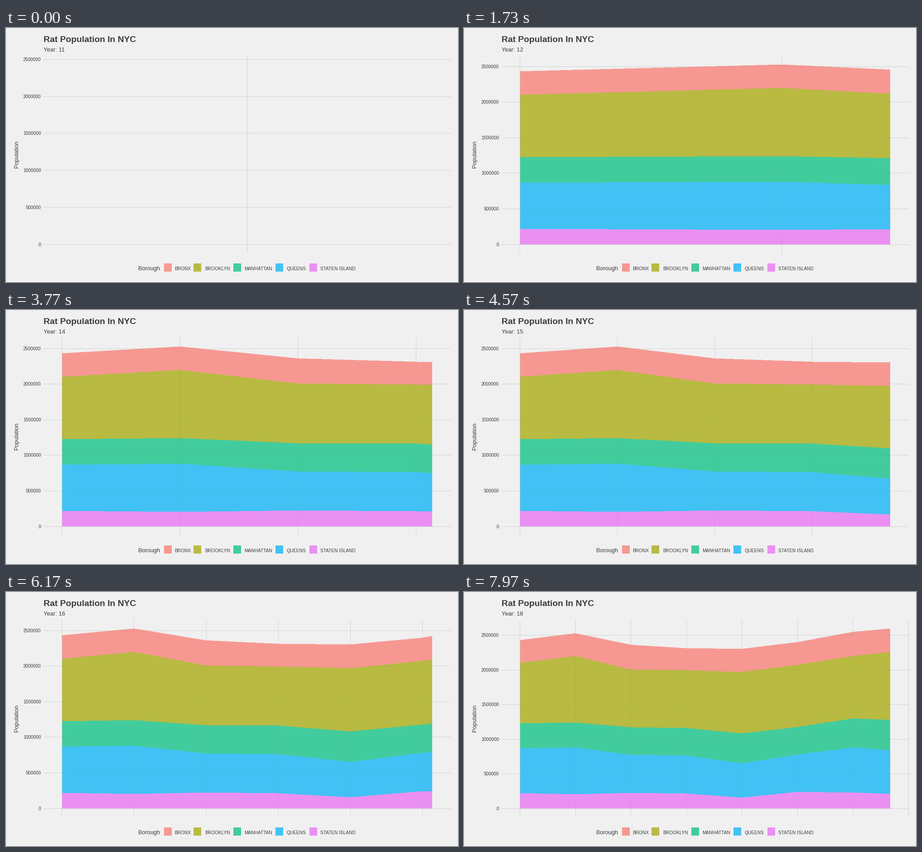
Write a matplotlib script that moves like this. It is 998 by 561 pixels and loops after 8 s.

```python
import matplotlib.pyplot as plt
import numpy as np
from matplotlib.animation import FuncAnimation
from matplotlib.collections import LineCollection
from matplotlib.path import Path
from matplotlib.patches import Rectangle

W, H, DPI = 998, 561, 100
FRAMES, LOOP = 240, 8000
BG, GRID, INK = "#f0f0f0", "#d2d2d2", "#3c3c3c"
X0, SPAN = 123.8, 817.8            # data area: left edge and width
Y0, RISE = 478.0, 396.9            # data area: zero line and height
FILL_L, FILL_R = 124, 941          # whole-pixel sides of the bands
LEFT, RIGHT, TOP, BOTTOM = 83, 982.5, 61, 497
CELL = 0.75                        # size of one stair step in pixels
ALPHA = 0.725

NAMES = ["BRONX", "BROOKLYN", "MANHATTAN", "QUEENS", "STATEN ISLAND"]
HUES = ["#f8766d", "#a3a500", "#00bf7d", "#00b0f6", "#e76bf3"]
KEY_X = [348.7, 414, 502, 595, 670]
LABEL_X = [372.5, 438.7, 526, 619.6, 693.7]

# stacked totals per year in thousands, top band first
TOTALS = np.array([
    [2429, 2526, 2359, 2314, 2300, 2400, 2545, 2620],
    [2102, 2198, 2005, 1992, 1968, 2073, 2200, 2287],
    [1225.5, 1237, 1168, 1160, 1080, 1174, 1297, 1267],
    [867, 878, 770, 761, 650, 778, 881, 813],
    [217, 204, 220, 214, 153, 239, 227, 198],
])
YEARS = np.arange(8)
TICKS = np.arange(0, 2501, 500)

plt.rcParams["font.family"] = ["Liberation Sans", "DejaVu Sans"]


def over_bg(color):
    rgb = [int(color[i:i + 2], 16) / 255 for i in (1, 3, 5)]
    return [ALPHA * c + (1 - ALPHA) * 240 / 255 for c in rgb]


def text(x, y, s, px, **kw):
    kw = {"va": "baseline", "color": INK, **kw}
    return ax.text(x, y, s, fontsize=px * 72 / DPI, **kw)


fig = plt.figure(figsize=(W / DPI, H / DPI), dpi=DPI, facecolor="white")
ax = fig.add_axes([0, 0, 1, 1])
ax.set_xlim(0, W)
ax.set_ylim(H, 0)
ax.axis("off")

ax.add_patch(Rectangle((0, 0), W, H - 1, color=BG, lw=0, zorder=0))
grid = LineCollection([], colors=GRID, lw=0.72, zorder=1, snap=False)
shade = LineCollection([], colors="black", alpha=0.04, lw=0.72, zorder=3,
                       snap=False)
ax.add_collection(grid, autolim=False)
ax.add_collection(shade, autolim=False)

bands = []
for name, hue, kx, lx in zip(NAMES, HUES, KEY_X, LABEL_X):
    fill = over_bg(hue)
    band, = ax.fill([0, 0, 0], [0, 0, 0], color=fill, lw=0, zorder=2,
                    snap=False)
    bands.append(band)
    ax.add_patch(Rectangle((kx, 520.2), 17, 17.3, color=fill, lw=0))
    text(lx, 534.6, name, 10.1)

text(82.6, 31, "Rat Population In NYC", 19.3, weight="bold")
year_text = text(82.6, 52, "", 12.9)
text(29.7, 279, "Population", 12.8, rotation=90, ha="right", va="center")
text(292, 535.4, "Borough", 12.8)
tick_texts = [text(77.3, 0, str(t * 1000), 10, ha="right") for t in TICKS]


def stairs(xs, px, py):
    """Edge through the points, as steps of whole cells."""
    gx, gy = np.rint(np.array(px) / CELL), np.rint(np.array(py) / CELL)
    return np.floor(np.interp(xs / CELL, gx, gy) + 1e-6) * CELL


def band_shape(px, py):
    xs = np.arange(FILL_L, FILL_R, CELL)
    ys = np.repeat(stairs(xs + CELL / 2, px, py), 2)
    sides = np.column_stack([xs, np.minimum(xs + CELL, FILL_R)]).ravel()
    top = np.column_stack([sides, ys])
    return np.vstack([[FILL_L, Y0], top, [FILL_R, Y0]])


def draw(k):
    now = np.interp(k, [0, 216, 250], [0, 6, 7])
    known = YEARS[YEARS < now] if k else YEARS[:1]
    times = np.append(known, now)
    values = [np.interp(times, YEARS, row) for row in TOTALS]
    scale = RISE / values[0].max()

    if k:
        years = YEARS[YEARS <= now * 1.05]
        cols = X0 + SPAN * years / now
    else:
        cols = np.array([532.5])
    rows = Y0 - TICKS * scale
    lines = [[(LEFT, np.floor(y) + .5), (RIGHT, np.floor(y) + .5)] for y in rows]
    lines += [[(np.floor(x) + .5, TOP), (np.floor(x) + .5, BOTTOM)] for x in cols]
    grid.set_segments(lines)
    shade.set_segments(lines if k else [])

    for band, row in zip(bands, values):
        band.set_visible(k > 0)
        if k:
            band.set_xy(band_shape(X0 + SPAN * times / now, Y0 - row * scale))
    if k:
        shade.set_clip_path(Path(bands[0].get_xy()), ax.transData)

    for label, y in zip(tick_texts, rows):
        label.set_y(np.floor(y) + 4.2)
    year_text.set_text(f"Year: {round(11 + 7 * k / 250)}")
    return [grid, shade, year_text, *bands, *tick_texts]


anim = FuncAnimation(fig, draw, frames=FRAMES, interval=LOOP / FRAMES,
                     init_func=lambda: draw(0), repeat=True, repeat_delay=0,
                     blit=False)
plt.show()
```
